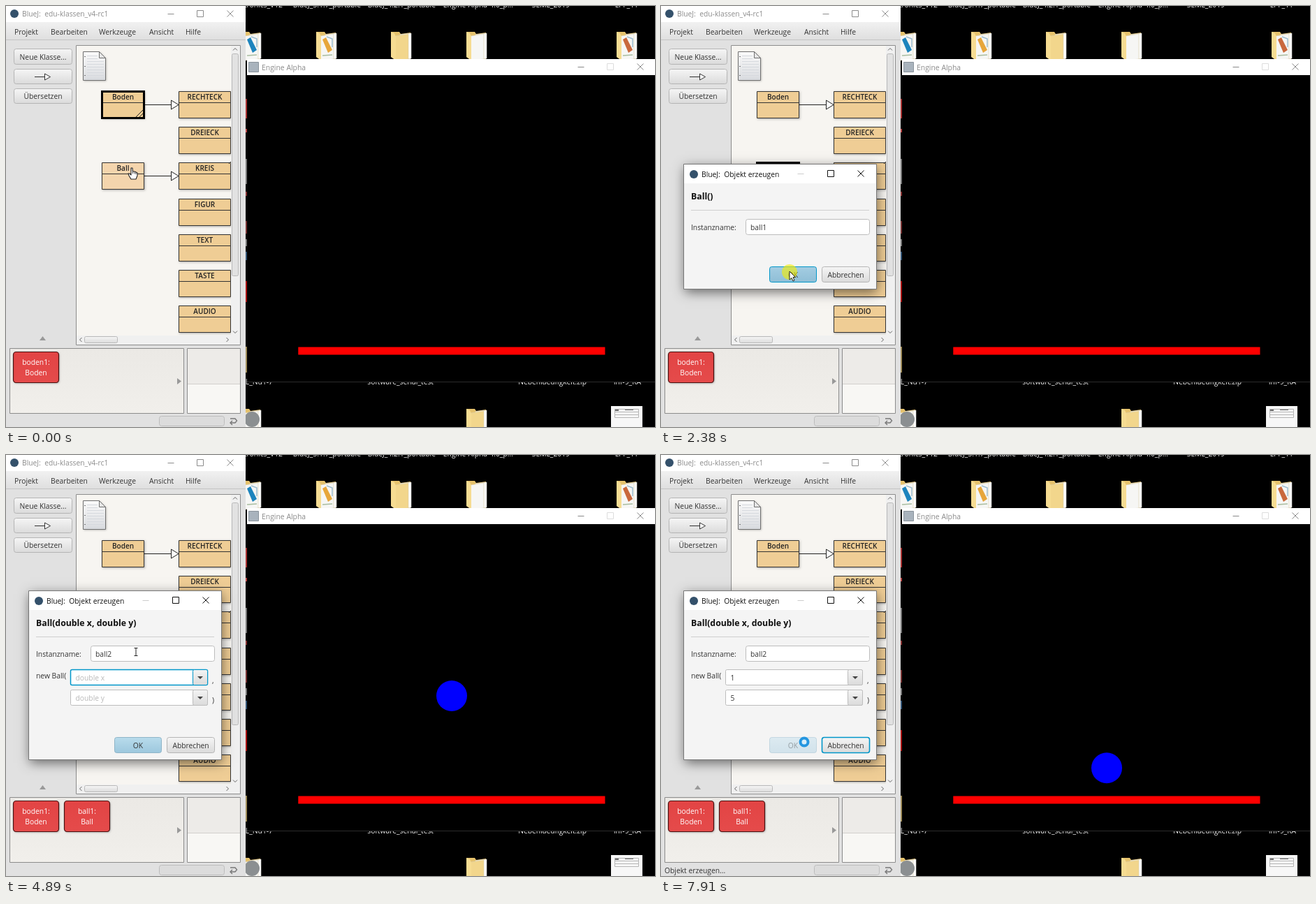
Write an HTML page with a canvas that moves like this. It is 929 by 603 pixels and loops after 8 s.

```html
<!DOCTYPE html>
<html lang="de">
<head>
<meta charset="utf-8">
<title>Objekt erzeugen</title>
<style>
html, body { margin: 0; width: 100%; height: 100%; overflow: hidden; background: #000; }
canvas { display: block; }
</style>
</head>
<body>
<canvas id="stage" width="929" height="603"></canvas>
<script>
const ctx = document.getElementById('stage').getContext('2d');
const LOOP = 8000;
const FONT = '"Open Sans", "Noto Sans", sans-serif';
const BLUE = '#0096c9', INK = '#333', EDGE = '#8c8c8c';

const STEPS = [0, 1, 440, 7, 1380, 1, 1540, 1, 1610, 7, 2380, 1, 2550, 1, 2630, 6, 3330, 1,
  3480, 1, 3560, 1, 3710, 9, 4720, 1, 4890, 1, 4950, 8, 5900, 1, 6050, 7, 6830, 1, 6980, 1,
  7060, 1, 7220, 6, 7910, 1, 8000];

const PATH = [[0, 180, 232], [708, 180, 232], [1380, 198, 288], [1720, 198, 288],
  [2270, 184, 380], [2550, 184, 380], [3210, 181, 240], [3560, 181, 240], [4271, 186, 254],
  [4720, 186, 254], [4890, 186, 282], [5300, 181, 319], [6050, 181, 319], [6494, 181, 348],
  [7220, 181, 348], [7565, 205, 411], [8000, 205, 411]];

const CLICKS = [[440, 570], [1530, 1605], [2370, 2540], [3320, 3470], [4200, 4300],
  [5400, 5500], [6490, 6600], [7670, 7780]];

const MENU = [
  ['new Ball(double x, double y)', 13.5], ['new Ball(String farbe)', 36.5], ['new Ball()', 59],
  ['Bearbeiten', 84], ['Übersetzen', 107], ['Inspizieren', 129.5], ['Entfernen', 152],
  ['Duplicate...', 175], ['Convert to Stride', 197.5], ['Testklasse erzeugen', 222.5],
  ['Klassenkarte', 247]];

function hold(t) {
  for (let i = 0; i < STEPS.length - 2; i += 2) {
    const [a, n, b] = STEPS.slice(i, i + 3);
    if (t < b) return a + Math.floor((t - a) / (b - a) * n) * (b - a) / n;
  }
  return t;
}

function cursorAt(t) {
  const i = Math.max(1, PATH.findIndex(p => p[0] > t));
  const [t0, x0, y0] = PATH[i - 1], [t1, x1, y1] = PATH[i];
  const k = (t - t0) / (t1 - t0), e = k * k * (3 - 2 * k);
  return [x0 + (x1 - x0) * e, y0 + (y1 - y0) * e];
}

// Free fall, then bounces that keep 70 % of the speed; 22 px per metre.
function ballY(t) {
  const g = 9.81, floor = 467, fall = Math.max(0, t / 1000 - 2.488);
  if (t < 4020) return Math.min(floor, 208 + 11 * g * fall * fall);
  let s = t / 1000 - 4.02, v = 10.64;
  while (s > 2 * v / g) { s -= 2 * v / g; v *= 0.7; }
  return floor - 22 * (v * s - g * s * s / 2);
}

function rect(x, y, w, h, fill) {
  ctx.fillStyle = fill;
  ctx.fillRect(x, y, w, h);
}

function box(x, y, w, h, fill, edge, r = 0, lw = 1) {
  ctx.beginPath();
  ctx.roundRect(x + .5, y + .5, w - 1, h - 1, r);
  if (fill) { ctx.fillStyle = fill; ctx.fill(); }
  if (edge) { ctx.strokeStyle = edge; ctx.lineWidth = lw; ctx.stroke(); }
}

function fade(y, h, a, b) {
  const g = ctx.createLinearGradient(0, y, 0, y + h);
  g.addColorStop(0, a);
  g.addColorStop(1, b);
  return g;
}

function poly(pts, fill, edge, lw = 1, close = true) {
  ctx.beginPath();
  for (let i = 0; i < pts.length; i += 2) ctx.lineTo(pts[i], pts[i + 1]);
  if (close) ctx.closePath();
  if (fill) { ctx.fillStyle = fill; ctx.fill(); }
  if (edge) { ctx.strokeStyle = edge; ctx.lineWidth = lw; ctx.stroke(); }
}
const line = (pts, edge, lw) => poly(pts, null, edge, lw, false);

function disc(x, y, r, fill) {
  ctx.beginPath();
  ctx.arc(x, y, r, 0, 7);
  ctx.fillStyle = fill;
  ctx.fill();
}

// y is the middle of the letters; the baseline sits on a whole pixel
function text(s, x, y, color = INK, size = 10.3, align = 'left', weight = 400) {
  ctx.font = `${weight} ${size}px ${FONT}`;
  ctx.textAlign = align;
  ctx.fillStyle = color;
  ctx.fillText(s, x, Math.round(y + size * .39));
}

function shadowed(blur, dx, dy, draw, alpha = .3) {
  ctx.save();
  ctx.shadowColor = `rgba(0,0,0,${alpha})`;
  ctx.shadowBlur = blur;
  ctx.shadowOffsetX = dx;
  ctx.shadowOffsetY = dy;
  draw();
  ctx.restore();
}

function controls([a, b, c], y, colors) {
  line([a - 4.5, y + .5, a + 4.5, y + .5], colors[0]);
  box(b - 5, y - 5, 10, 10, null, colors[1]);
  line([c - 4.5, y - 4.5, c + 4.5, y + 4.5], colors[2]);
  line([c - 4.5, y + 4.5, c + 4.5, y - 4.5], colors[2]);
}

function folder(x, y, tint) {
  poly([x, y + 1, x + 12, y + 1, x + 14, y + 4, x + 28, y + 2, x + 28, y + 42, x, y + 37], '#e6c26c');
  const page = tint === 'fill' ? '#f2d68c' : '#f6f6f4';
  poly([x + 13, y + 5, x + 29, y + 3, x + 29, y + 39, x + 13, y + 42], '#fff', '#d4d4d0', .6);
  poly([x + 6, y + 7, x + 25, y + 4, x + 25, y + 40, x + 6, y + 42], page, '#d9cda8', .6);
  if (tint && tint !== 'fill') {
    poly([x + 9, y + 12, x + 14, y + 9, x + 23, y + 27, x + 17, y + 31], tint);
    line([x + 15, y + 8, x + 23, y + 11, x + 23, y + 23], '#9dbccd', 1.5);
    line([x + 9, y + 35, x + 23, y + 34], '#a9bda0', 1.5);
  }
  poly([x, y + 1, x + 5, y + 3, x + 7, y + 8, x + 7, y + 42, x, y + 37], '#f6dc92');
}

function desktop() {
  rect(0, 0, 929, 603, '#000');
  const top = [['tronics_V12', 396], ['BlueJ_3.1.7_portable', 508], ['BlueJ_4.2.1_portable', 615],
    ['Engine-Alpha-4.0_p...', 726], ['SEML_2019', 807], ['LPF_11', 905]];
  for (const [s, x] of top) text(s, x, -2, '#eee', 10.3, 'right');
  const low = [['L_Nu1-7', 382], ['software_serial_test', 612], ['Nebenlaeufigkeit.zip', 831], ['Inf-9_KA', 909]];
  for (const [s, x] of low) text(s, x, 538, '#eee', 10.3, 'right');
  folder(336, 36, '#1d84bd');
  folder(444, 36, '#e7a63b');
  folder(551, 36, 'fill');
  folder(659, 36);
  folder(874, 36, '#c9683c');
  folder(336, 576);
  disc(352, 592, 11, '#8b8f91');
  folder(659, 576, 'fill');
  rect(866, 573, 45, 30, '#f7f7f7');
  for (let i = 0; i < 3; i++) box(871, 577 + i * 4, 35, 5, null, '#b5b5b5');
  rect(872, 578, 5, 2, '#666');
  rect(886, 578, 12, 1, '#666');
}

function engine(t) {
  rect(345, 76, 584, 462, '#000');
  rect(345, 76, 584, 23, '#fff');
  rect(345, 538, 584, 1, '#2b2b2b');
  box(347, 80, 15, 15, '#a9b3bd', '#8a939b');
  text('Engine Alpha', 366, 87.5, '#8a8a8a', 10.4);
  controls([823, 865, 908], 87, ['#888', '#ddd', '#888']);
  const bits = [[133, 28, '#a33'], [176, 5, '#b44'], [219, 36, '#777'], [266, 6, '#833'],
    [308, 18, '#733'], [334, 10, '#777'], [352, 12, '#357'], [394, 30, '#a11'], [488, 37, '#a08d5c']];
  for (const [y, h, c] of bits) rect(343, y, 2, h, c);
  if (t >= 2550) disc(638, ballY(t), 22, '#00f');
  rect(418.3, 488.5, 439.2, 11, '#f00');
}

function button(x, y, w, h, label) {
  box(x, y, w, h, fade(y, h, '#f6f6f6', '#dadada'), '#b5b5b5', 3);
  if (label) text(label, x + w / 2, y + h / 2, INK, 10.3, 'center');
}

function classBox(x, y, w, name, o = {}) {
  const fill = o.hover ? '#f4d5ad' : '#efcd95';
  shadowed(3, 1, 1, () => rect(x, y, w, 39, fill));
  box(x, y, w, 39, null, '#333');
  rect(x, y + 16, w, 1, '#333');
  text(name, x + w / 2, y + 8.5, '#222', 10, 'center', 600);
  if (o.selected) {
    line([x + w - 13, y + 38, x + w, y + 25], '#222');
    line([x + w - 8, y + 38, x + w, y + 30], '#222');
    box(x, y, w, 39, null, '#000', 0, 3);
  }
}

function inherits(y) {
  line([198, y, 236, y], '#222');
  poly([236.5, y - 6.5, 247, y, 236.5, y + 6.5], '#fff', '#222');
}

function chevron(x, y, dx, dy) {
  line([x - dx * 1.5 - dy * 3, y - dy * 1.5 - dx * 3, x + dx * 1.5, y + dy * 1.5,
    x - dx * 1.5 + dy * 3, y - dy * 1.5 + dx * 3], '#666');
}

function diagram(s) {
  rect(100, 56, 236, 430, '#f7f5f1');
  ctx.save();
  ctx.beginPath();
  ctx.rect(101, 57, 221.5, 415);
  ctx.clip();
  const sheet = [110.5, 65.5, 133.5, 65.5, 142.5, 74.5, 142.5, 106.5, 110.5, 106.5];
  shadowed(3, 1, 1, () => poly(sheet, fade(65, 42, '#fbfbfb', '#d9dbdf')));
  for (let y = 71; y < 105; y += 4) line([116, y + .5, y < 76 ? 131 : 140, y + .5], '#d6d9de');
  poly(sheet, null, '#707070');
  poly([133.5, 65.5, 133.5, 74.5, 142.5, 74.5], '#e6e6e6', '#707070');
  for (const y of [72, 86, 99]) rect(112, y, 2, 1, '#777');
  ['RECHTECK', 'DREIECK', 'KREIS', 'FIGUR', 'TEXT', 'TASTE', 'AUDIO'].forEach((n, i) =>
    classBox(247, Math.round(121.8 + i * 51.25), 75, n));
  line([319, 226, 323, 222], '#222');
  inherits(141.5);
  inherits(243.5);
  classBox(137, 122, 61, 'Boden', { selected: s.t < 500 });
  classBox(137, 224, 61, 'Ball', { selected: s.t >= 500, hover: s.hand });
  ctx.restore();

  rect(322, 57, 13, 428, '#f0f0f0');
  rect(101, 472, 234, 13, '#f0f0f0');
  box(323, 68, 10, 319, '#e2e2e2', '#b9b9b9', 2);
  box(112, 473, 48, 10, fade(473, 10, '#f7f7f7', '#dadada'), '#b9b9b9', 2);
  chevron(328, 62, 0, -1);
  chevron(328, 467, 0, 1);
  chevron(107, 478, -1, 0);
  chevron(317, 478, 1, 0);
  box(100, 56, 236, 430, null, EDGE);
}

function benchObject(x, name, type) {
  shadowed(3, 1, 1, () => box(x, 495, 66, 45, fade(495, 45, '#e24444', '#e54b4b'), null, 4));
  box(x, 495, 66, 45, null, '#4a1010', 4, 1.2);
  text(name, x + 33, 510, '#fff', 10.3, 'center');
  text(type, x + 33, 525, '#fff', 10.3, 'center');
}

function mainWindow(s) {
  rect(0, 0, 343, 603, '#e1e1e1');
  rect(0, 0, 343, 23, '#fff');
  rect(0, 23, 343, 25, fade(23, 25, '#f1f1f1', '#dfdfdf'));
  rect(0, 48, 343, 1, '#c4c4c4');
  const c = s.active ? '#111' : '#8c8c8c';
  disc(12, 11, 6, '#34516b');
  text('BlueJ:  edu-klassen_v4-rc1', 23, 11.4, c);
  controls([236, 278, 321], 11, [c, c, c]);
  [['Projekt', 12], ['Bearbeiten', 64], ['Werkzeuge', 133], ['Ansicht', 205], ['Hilfe', 257]]
    .forEach(([m, x]) => text(m, x, 37.4));

  button(11, 61, 84, 23, 'Neue Klasse...');
  button(11, 90, 84, 22);
  button(11, 118, 84, 22, 'Übersetzen');
  line([41, 101.5, 55, 101.5], INK);
  poly([55.5, 97, 63.5, 101.5, 55.5, 106], '#fff', INK);
  diagram(s);

  poly([48, 479, 52.5, 473, 57, 479], '#999');
  box(5, 490, 250, 94, fade(490, 94, '#ebe9e5', '#f1efeb'), EDGE);
  poly([245, 533, 251, 537.5, 245, 542], '#999');
  benchObject(10, 'boden1:', 'Boden');
  if (s.t >= 2630) benchObject(83, 'ball1:', 'Ball');
  rect(259, 490, 77, 52, '#edebe8');
  rect(259, 542, 77, 42, '#f8f7f4');
  rect(259, 541, 77, 1, '#d2d0cd');
  box(259, 490, 77, 94, null, EDGE);
  box(219, 587, 94, 15, '#dcdcdc', '#bdbdbd', 3);
  line([321, 591, 328, 591, 330.5, 594, 328, 597, 321, 597], '#777', 1.4);
  line([324, 594, 321, 597, 324, 600], '#777', 1.4);
  if (s.status) text('Objekt erzeugen...', 5, 595);
}

function menu(y, cy) {
  shadowed(12, 1, 4, () => box(180, y - 1, 156, 263, '#fff', '#c4c4c4'), .5);
  MENU.forEach(([label, dy], i) => {
    const hot = Math.abs(y + dy - cy) < 11.5;
    if (hot) rect(181, y + dy - 12, 154, 24, BLUE);
    text(label, 187, y + dy, hot ? '#fff' : i > 2 && i < 10 ? '#8a1010' : INK);
  });
  for (const dy of [71, 209, 234]) rect(181, y + dy, 154, 1, '#ccc');
}

function combo(y, value, hint, focus, caret) {
  box(92, y, 197, 23, '#fff', focus ? BLUE : '#bdbdbd', 2, focus ? 1.5 : 1);
  box(267, y, 22, 23, fade(y, 23, '#f4f4f4', '#dadada'), focus ? BLUE : '#bdbdbd', 2);
  poly([274, y + 10, 282, y + 10, 278, y + 14], '#444');
  text(value || hint, 99.5, y + 12, value ? INK : '#b9b9b9');
  if (focus && caret) rect(value ? 106 : 99, y + 5, 1, 14, '#222');
}

function dialog(s, big) {
  const y = big ? 195 : 227, h = big ? 242 : 179, by = y + h - 33;
  const busy = big && s.busy, pressed = !big && s.click;
  shadowed(16, 1, 4, () => rect(33, y, 275, h, '#f4f4f4'), .55);
  rect(33, y, 275, 27, '#fff');
  box(32, y - 1, 277, h + 1, null, '#777');
  disc(47, y + 14, 6, '#34516b');
  text('BlueJ:  Objekt erzeugen', 58, y + 14, '#111');
  controls([200, 243, 286], y + 13, ['#ccc', '#111', '#111']);
  text(big ? 'Ball(double x, double y)' : 'Ball()', 43, y + 45, '#111', 12.3, 'left', 700);
  rect(43, y + 65, 255, 1, '#cfcfcf');
  text('Instanzname:', 43, y + 90);
  box(121, y + 78, 178, 23, '#fff', '#bdbdbd', 3);
  text(big ? 'ball2' : 'ball1', 128, y + 90);
  if (big) {
    const onY = s.t >= 6490;
    text('new Ball(', 43, 316);
    combo(307, s.t >= 5700 ? '1' : '', 'double x', !onY, s.caret);
    combo(336, s.t >= 7050 ? '5' : '', 'double y', onY && !busy, s.caret);
    text(',', 295, 323);
    text(')', 295, 351);
  }
  ctx.globalAlpha = busy ? .4 : 1;
  const fill = pressed ? fade(by, 23, '#a4cde2', '#8fbed6') : fade(by, 23, '#b9dcec', '#9cc7dd');
  box(155, by, 68, 23, fill, pressed ? BLUE : '#8fb5c8', 3);
  text('OK', 189, by + 11.5, INK, 10.3, 'center');
  ctx.globalAlpha = 1;
  button(230, by, 69, 23, 'Abbrechen');
  if (busy) box(230, by, 69, 23, null, BLUE, 3, 1.6);
}

function cursor(s) {
  const { x, y } = s;
  if (s.click) disc(x, y + 1, 11, 'rgba(243,238,0,.62)');
  ctx.save();
  ctx.translate(x, y);
  ctx.lineJoin = 'round';
  if (s.busy) {
    ctx.beginPath();
    ctx.arc(0, 0, 5.5, 0, 7);
    ctx.fillStyle = '#d8eefa';
    ctx.fill();
    ctx.lineWidth = 4;
    ctx.strokeStyle = '#2496e0';
    ctx.stroke();
  } else if (s.hand) {
    poly([-1, 0, 1, 0, 1.5, 5, 4, 5, 6, 6, 8, 7, 8, 11, 6, 16, -1, 16, -4, 11, -5, 8, -3, 8, -1, 10], '#fff', '#222', 1.1);
    line([1.5, 5, 1.5, 8], '#222', .8);
    line([4, 5.5, 4, 8.5], '#222', .8);
    line([6, 6.5, 6, 9], '#222', .8);
  } else if (s.t >= 4890 && s.t < 7330) {
    line([0, -5, 0, 5], '#222');
    line([-2.5, -5.5, 2.5, -5.5], '#222');
    line([-2.5, 5.5, 2.5, 5.5], '#222');
  } else {
    poly([0, 0, 0, 12, 3, 9.5, 5, 14, 7, 13, 5, 8.5, 8.5, 8.5], '#fff', '#222');
  }
  ctx.restore();
}

function draw(time) {
  const t = hold(time % LOOP), within = (a, b) => t >= a && t < b;
  const [x, y] = cursorAt(t);
  const s = {
    t, x, y,
    click: CLICKS.some(([a, b]) => within(a, b)),
    active: within(440, 1800) || within(2550, 4490),
    hand: t < 550 || within(3090, 3480),
    busy: t >= 7900,
    status: within(2550, 2630) || t >= 7900,
    caret: (t + 620) % 1000 < 500
  };
  desktop();
  engine(t);
  mainWindow(s);
  if (within(550, 1700)) menu(232, y + 2);
  if (within(3480, 4380)) menu(241, y + 1);
  if (within(1800, 2550)) dialog(s, false);
  if (t >= 4490) dialog(s, true);
  cursor(s);
}

const start = performance.now();
function tick() {
  draw(performance.now() - start);
  requestAnimationFrame(tick);
}
tick();
</script>
</body>
</html>
```
